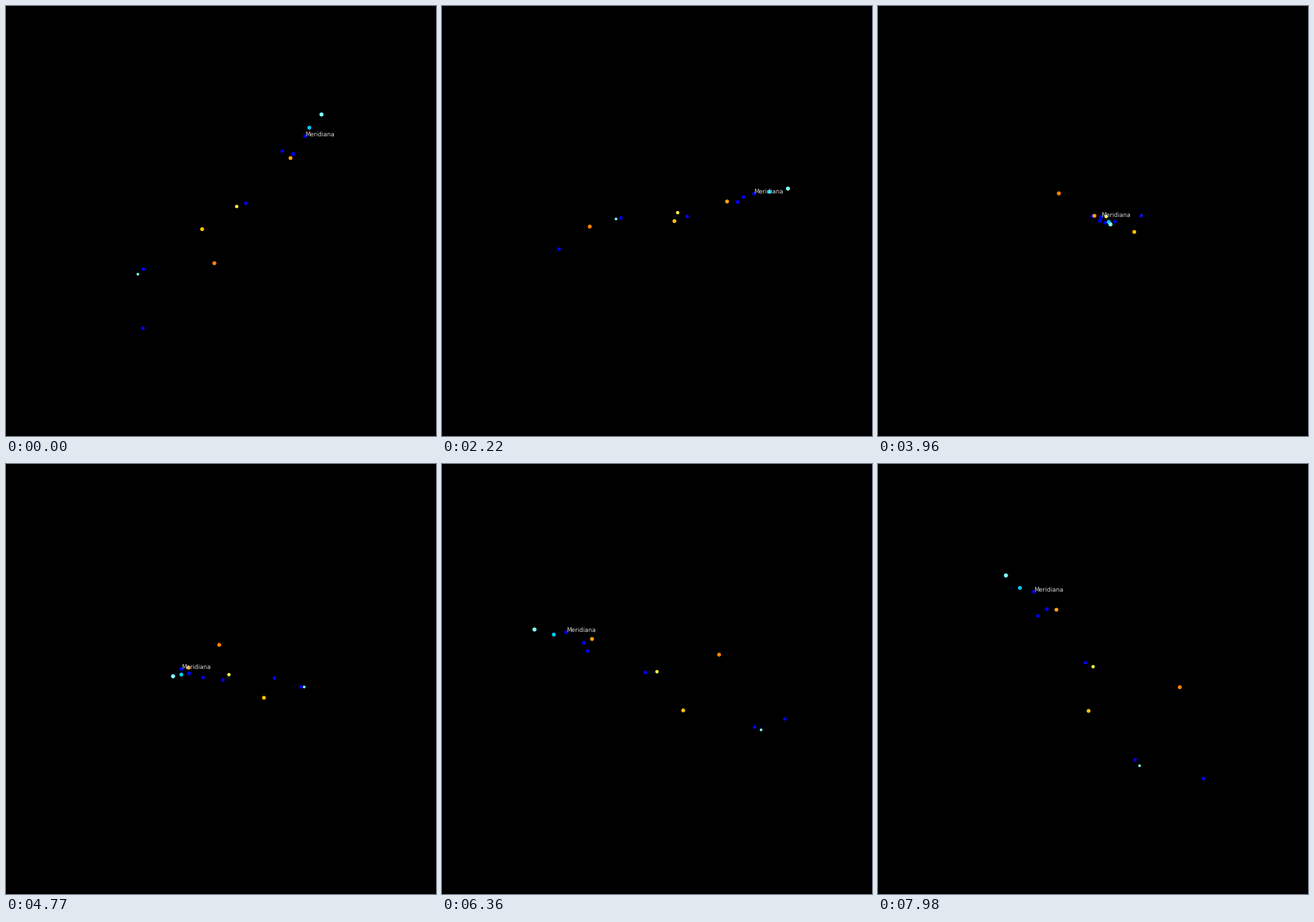
A matplotlib script for the animation above (8000 ms loop, 640 by 640 pixels).

```python
import numpy as np
import matplotlib.pyplot as plt
from matplotlib.animation import FuncAnimation

SIZE, DPI = 640, 80
FRAMES, LOOP_MS = 267, 8000
CENTER = 334.8, 316.1        # screen position of the pivot
EYE = 2664.0                 # camera distance in pixels
ELEV = np.radians(30)
BLUE = "#0000ff"

# right, toward the viewer, up (pixels from the pivot), diameter, colour
STARS = [
    (138.2, -138.3, 103.3, 6.1, "#7dffff"),
    (119.1, -117.9, 91.1, 5.8, "#00ccff"),
    (111.8, -97.1, 87.3, 5.5, BLUE),      # the labelled one
    (89.4, -64.2, 67.4, 5.8, "#ffa20a"),
    (93.8, -78.7, 66.6, 5.8, BLUE),
    (77.8, -92.8, 64.1, 5.2, BLUE),
    (22.3, -24.6, 11.8, 5.2, BLUE),
    (8.6, -14.1, 12.3, 5.0, "#ffff46"),
    (-43.5, -24.3, -32.8, 5.8, "#ffc005"),
    (-23.8, 112.6, -9.4, 5.9, "#ff8005"),
    (-138.4, 43.3, -70.9, 4.0, "#7dfff0"),
    (-130.4, 37.4, -65.7, 5.2, BLUE),
    (-127.7, 138.3, -104.3, 5.2, BLUE),
]
NAMED = 2

right, near, up, diameter = np.array([s[:4] for s in STARS]).T
colors = np.array([s[4] for s in STARS])
areas = (diameter * 72 / DPI) ** 2


def project(frame):
    """Screen positions and nearness after turning one degree per frame."""
    a = np.radians(frame)
    x = right * np.cos(a) - near * np.sin(a)
    h = near * np.cos(a) + right * np.sin(a)
    toward = h * np.cos(ELEV) + up * np.sin(ELEV)
    y = up * np.cos(ELEV) - h * np.sin(ELEV)
    scale = 1 / (1 - toward / EYE)
    pos = np.column_stack([CENTER[0] + x * scale, CENTER[1] - y * scale])
    return pos, toward


fig = plt.figure(figsize=(SIZE / DPI, SIZE / DPI), dpi=DPI, facecolor="black")
ax = fig.add_axes([0, 0, 1, 1])
ax.set_xlim(0, SIZE)
ax.set_ylim(SIZE, 0)
ax.axis("off")

dots = ax.scatter(np.zeros(len(STARS)), np.zeros(len(STARS)), linewidths=0)
label = ax.text(0, 0, "Meridiana", color="0.82", fontsize=8,
                family="DejaVu Sans", ha="left", va="baseline", zorder=5)


def update(frame):
    pos, toward = project(frame)
    order = np.argsort(toward)   # far stars are painted first
    dots.set_offsets(pos[order])
    dots.set_sizes(areas[order], dpi=DPI)
    dots.set_facecolors(colors[order])
    label.set_position(pos[NAMED])
    return dots, label


anim = FuncAnimation(fig, update, frames=FRAMES, init_func=lambda: update(0),
                     interval=LOOP_MS / FRAMES, repeat=True, repeat_delay=0)
plt.show()
```
